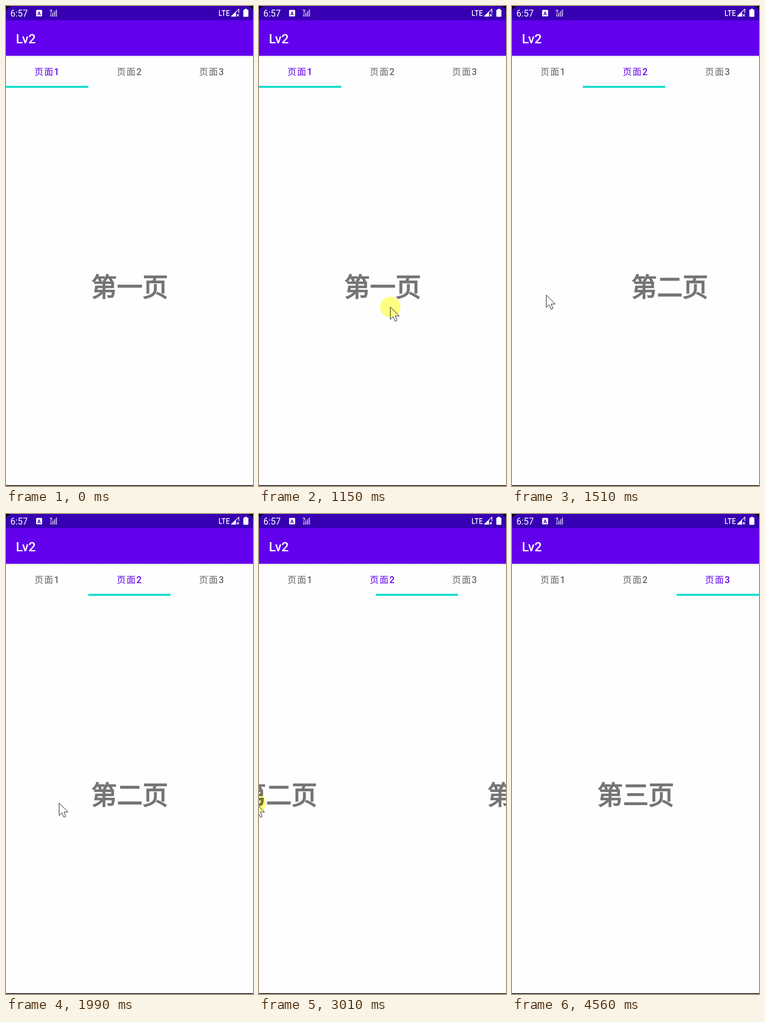
Recreate the animation shown at these times as an HTML page with a canvas. Size 537x1042 px, loop 5420 ms.

```html
<!DOCTYPE html>
<html lang="zh-CN">
<head>
<meta charset="utf-8">
<style>
  html, body { margin: 0; width: 100%; height: 100%; overflow: hidden; background: #000; }
  canvas { display: block; }
</style>
</head>
<body>
<canvas id="stage" width="537" height="1042"></canvas>
<script>
const W = 537, H = 1042, LOOP = 5420;
const TICKS = 70;   // the screen refreshes this often per loop; all motion is timed in ticks
const SLOP = 62;    // distance a drag covers before the page follows
const CJK = '"Noto Sans CJK SC", "Noto Sans CJK", sans-serif';
const ROBOTO = 'Roboto, sans-serif';
const ctx = document.getElementById('stage').getContext('2d');

// Pointer moves: eased from the previous place to (x, y) between two ticks.
const origin = { x: 398, y: 975 };
const moves = [
  { from: 3, to: 10, x: 330, y: 666 },
  { from: 14, to: 15, x: 285, y: 653 },
  { from: 14.5, to: 18, x: 74, y: 627 },
  { from: 24, to: 31, x: 280, y: 627 },
  { from: 36, to: 40, x: -61, y: 627 },
  { from: 52, to: 53, x: 7, y: 650 },
  { from: 53, to: 58, x: 288, y: 1005 }
];
moves[2].from = moves[1].to;

const swipes = [{ press: 12, release: 18 }, { press: 33, release: 40 }];

function pointerAt(tick) {
  let { x, y } = origin;
  for (const move of moves) {
    const k = Math.min(1, Math.max(0, (tick - move.from) / (move.to - move.from)));
    const eased = k * k * (3 - 2 * k);
    x += (move.x - x) * eased;
    y += (move.y - y) * eased;
  }
  return { x: Math.round(x), y: Math.round(y) };
}

// The page follows the drag, then decelerates to rest shortly after release.
function swipeOffset({ press, release }, tick) {
  const rest = release + 4.1;
  if (tick < press) return 0;
  if (tick >= rest) return W;
  const dragged = pointerAt(press).x - pointerAt(tick).x;
  let left = W - Math.max(0, dragged - SLOP);
  if (tick >= release) left = Math.min(left, 17 * (rest - tick) ** 2);
  return W - Math.floor(left);
}

function rect(color, x, y, w, h) {
  ctx.fillStyle = color;
  ctx.fillRect(x, y, w, h);
}

function text(str, x, y, font, color, align = 'left') {
  ctx.font = font;
  ctx.fillStyle = color;
  ctx.textAlign = align;
  ctx.fillText(str, x, y);
}

function shape(d, fill, stroke, width = 1) {
  const p = new Path2D(d);
  if (fill) { ctx.fillStyle = fill; ctx.fill(p); }
  if (stroke) { ctx.strokeStyle = stroke; ctx.lineWidth = width; ctx.stroke(p); }
}

function drawPages(offset) {
  [...'一二三'].forEach((n, i) => {
    const x = W / 2 + 0.5 + i * W - offset, y = 629.5, title = `第${n}页`;
    text(title, x, y, '55.7px ' + CJK, '#757575', 'center');
    // Synthetic bold: the regular weight with a thin outline.
    ctx.strokeStyle = '#757575';
    ctx.lineWidth = 2;
    ctx.strokeText(title, x, y);
  });
}

function drawTabs(offset, selected) {
  for (let i = 0; i < 3; i++) {
    const x = i * W / 3, color = i === selected ? '#6200ee' : '#666';
    ctx.letterSpacing = '1.75px';
    text('页面', x + 61.8, 150.3, '19.5px ' + CJK, color);
    ctx.letterSpacing = '0px';
    text(i + 1, x + 104.5, 150.3, '500 19.5px ' + ROBOTO, color);
  }
  rect('#03dac5', Math.round(offset / 3), 173.4, W / 3, 4.1);
}

function drawBars() {
  const shadow = ctx.createLinearGradient(0, 108, 0, 112);
  shadow.addColorStop(0, '#dcdcdc');
  shadow.addColorStop(1, '#fefefe');
  rect(shadow, 0, 108, W, 4);
  rect('#6200ee', 0, 31, W, 77);
  rect('#3700b3', 0, 0, W, 31);
  text('Lv2', 21.5, 81, '500 28px ' + ROBOTO, '#fff');
  text('6:57', 9.5, 22.5, '19.5px ' + ROBOTO, '#fff');

  // Input method badge
  shape('M67 8.5h10q1.5 0 1.5 1.5v11q0 1.5-1.5 1.5H67q-1.5 0-1.5-1.5V10q0-1.5 1.5-1.5z', '#fff');
  text('A', 72, 19.5, 'bold 11px ' + ROBOTO, '#3700b3', 'center');

  // Unknown network
  for (let i = 0; i < 4; i++) {
    const h = 5 + i * 3.4;
    rect('rgba(255,255,255,.55)', 96 + i * 4, 23 - h, 3, h);
  }
  text('?', 94.5, 17, '500 13px ' + ROBOTO, '#fff');

  // LTE, signal without data, battery
  shape('M464 9v11.7h5.5M469 9.8h8.5M473.2 9.8v11.7M486 9.8h-6v10.9h6M480 15.2h5.3', null, '#fff', 1.7);
  shape('M489 23L500 12.5V23z', '#fff');
  shape('M490 22.3L506.3 7V15M501.5 17.5l5 5M506.5 17.5l-5 5', null, '#fff', 1.5);
  shape('M519 6h5v2h2q1 0 1 1v13q0 1.5-1.5 1.5h-8q-1.5 0-1.5-1.5V9q0-1 1-1h2z', '#fff');

  // Rounded screen corners and bottom edge
  shape('M0 0H13A13 13 0 0 0 0 13zM537 0H524A13 13 0 0 1 537 13z', '#000');
  rect('#000', 0, 1040.4, W, 2);
}

function drawPointer({ x, y }, pressed) {
  ctx.save();
  ctx.translate(x + 0.5, y + 0.5);
  shape('M0 0V27L6 21L10.5 31L14.5 29L10.5 19.5H19.5z', '#fff', '#000');
  if (pressed) {
    ctx.globalCompositeOperation = 'multiply';
    ctx.beginPath();
    ctx.arc(0, 0, 22.2, 0, 2 * Math.PI);
    ctx.fillStyle = '#ffff80';
    ctx.fill();
  }
  ctx.restore();
}

function draw(now) {
  const tick = Math.floor((now % LOOP) / LOOP * TICKS + 0.51);
  const offset = swipes.reduce((sum, s) => sum + swipeOffset(s, tick), 0);
  const selected = swipes.filter(s => tick >= s.release).length;

  rect('#fefefe', 0, 0, W, H);
  drawPages(offset);
  drawTabs(offset, selected);
  drawBars();
  if (tick >= 3 && tick < 59) {
    drawPointer(pointerAt(tick), swipes.some(s => tick >= s.press && tick < s.release));
  }
}

const start = performance.now();
function frame() {
  draw(performance.now() - start);
  requestAnimationFrame(frame);
}
frame();
</script>
</body>
</html>
```
